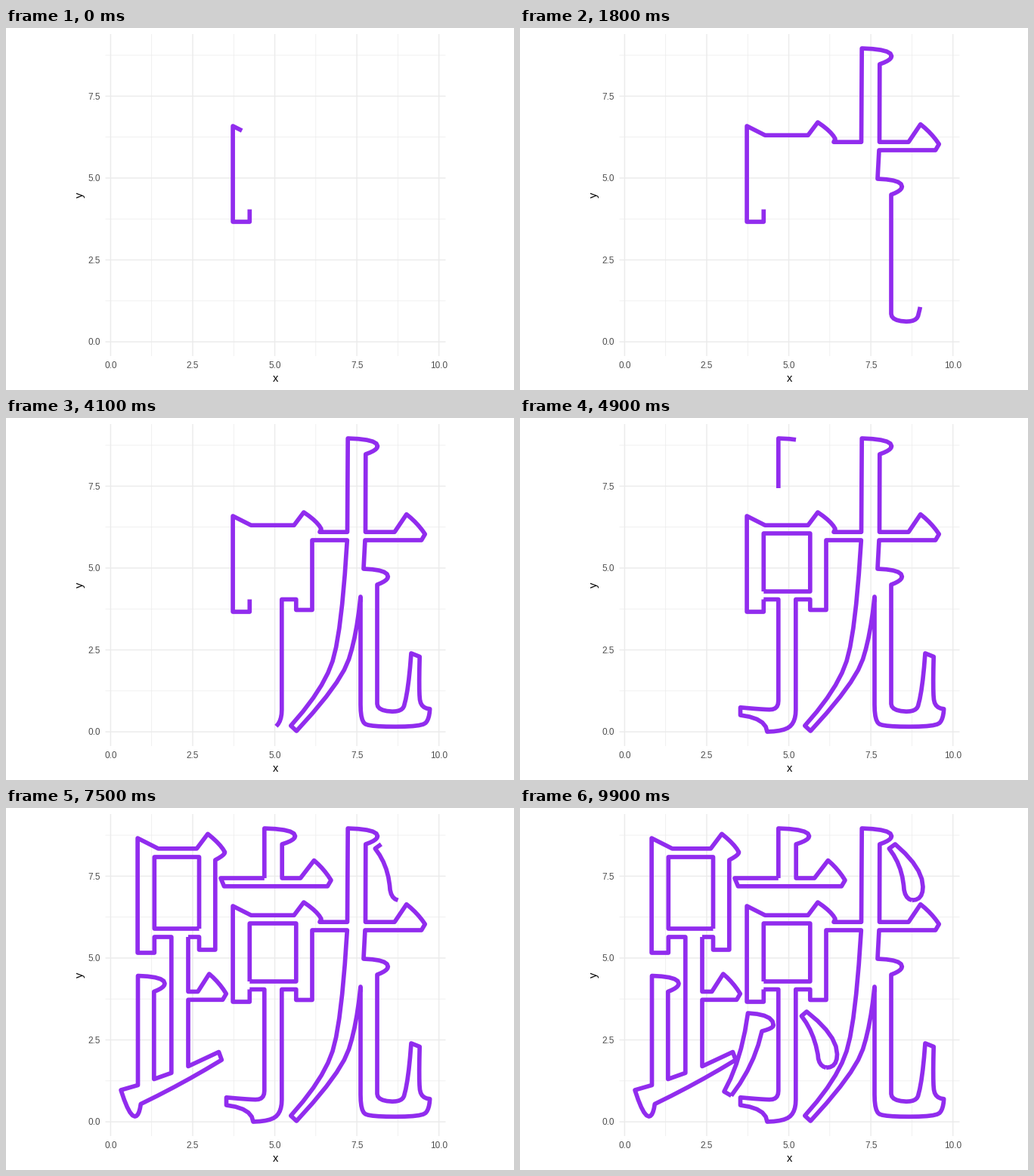
Write a matplotlib script that moves like this. It is 672 px wide and 480 px high and loops after 10 s.

```python
import numpy as np
import matplotlib.pyplot as plt
from matplotlib.animation import FuncAnimation

W, H, DPI = 672, 480, 96
FRAMES, STEP = 100, 100
SEGS = 5  # line pieces per quadratic curve

plt.rcParams["font.family"] = "Liberation Sans"
plt.rcParams["path.simplify"] = False


class Pen:
    """Collects outline vertices in stage pixels; NaN rows lift the pen."""

    def __init__(self):
        self.pts = []

    def start(self, x, y):
        if self.pts:
            self.pts.append((np.nan, np.nan))
        self.pts.append((x, y))
        self.home = x, y

    def go(self, x=None, y=None):
        px, py = self.pts[-1]
        self.pts.append((px if x is None else x, py if y is None else y))

    def by(self, dx, dy):
        x, y = self.pts[-1]
        self.pts.append((x + dx, y + dy))

    def steps(self, *values):
        """Right-angled moves, alternating x and y."""
        for i, v in enumerate(values):
            self.go(**{"xy"[i % 2]: v})

    def close(self):
        self.go(*self.home)

    def bend(self, *coords):
        """Smooth curve: control points, then the end."""
        *ctrl, end = np.reshape(np.array(coords, float), (-1, 2))
        for i, c in enumerate(ctrl):
            a = np.array(self.pts[-1])
            b = end if i == len(ctrl) - 1 else (c + ctrl[i + 1]) / 2
            for t in np.linspace(0, 1, SEGS + 1)[1:]:
                p = (1 - t) ** 2 * a + 2 * t * (1 - t) * c + t * t * b
                self.pts.append(tuple(p))

    def head(self, w, foot, drop=10.3, fall=21):
        """Rounded cap on top of a vertical stroke."""
        x, y = self.pts[-1]
        self.bend(x + w, y + drop / 10, x + w, y + drop)
        self.bend(x + w, y + (drop + fall) / 2, x + foot, y + fall)

    def peak(self, dx, w):
        """Triangle that ends a horizontal stroke."""
        self.by(dx, -23.5)
        x, y = self.pts[-1]
        self.bend(x + w * 0.6, y + 11.5, x + w, y + 26.3)
        self.by(-4.7, 8)

    def frame(self, foot, top, right, rise):
        """Left leg, ear and top edge of a box-shaped part."""
        self.by(0, foot)
        self.by(-22.2, 0)
        self.go(y=top)
        self.by(rise * 1.4, rise * 0.71)
        self.go(x=right)
        self.by(rise * 0.75, -rise)

    def dot(self, x, y, lean):
        self.start(x, y)
        self.bend(x - 10.5, y - 2.3, x - 11, y - 20 + lean)
        self.bend(x - 14 - lean, y - 48, x - 30.2 - lean, y - 68.5)
        self.by(8 - lean / 2, -5.8)
        self.bend(x + 14.5, y - 43, x + 14.5, y - 17.8)
        self.bend(x + 14.5, y, x, y)


def outline():
    p = Pen()

    # right part joined to the middle one
    p.start(322.3, 240.5)
    p.frame(16.5, 130, 381, 17.2)
    p.bend(412, 137, 417, 147)
    p.go(415, 151.2)
    p.go(451.5)
    p.go(452.2, 27)
    p.head(39.3, 23.6)
    p.go(475.5, 151.2)
    p.go(514)
    p.peak(15.8, 24.5)
    p.go(475)
    p.go(473, 200)
    p.head(32.3, 18)
    p.go(y=379)
    p.bend(491.2, 388.5, 511, 389.2)
    p.bend(524, 389.2, 526.5, 382)
    p.bend(532.5, 362, 536, 312)
    p.go(547.2, 316.5)
    p.bend(546, 362, 549, 385, 560.7, 385.8)
    p.bend(560, 399.5, 550, 409.3, 515, 409.3)
    p.bend(482, 409.3, 469, 402.5, 469, 380)
    p.go(y=237)
    p.bend(464, 288, 443, 352, 384.3, 415)
    p.go(376.8, 408)
    p.bend(420, 360, 444, 285, 451.3, 162)
    p.steps(405, 254.5, 383.8, 240.5, 364.8, 387)
    p.bend(364.8, 402, 350, 415.5, 327, 416)
    p.bend(325.5, 398, 291.5, 394)
    p.go(y=383.8)
    p.bend(318, 386.3, 341.8, 387, 341.8, 375)
    p.go(y=240.5)
    p.close()

    p.start(322.3, 230)
    p.steps(383.8, 153, 322.3, 230)

    # lid above the middle
    p.start(341.8, 93)
    p.go(y=27)
    p.head(40.7, 23.4)
    p.go(y=93)
    p.go(389.5)
    p.peak(18, 22.5)
    p.go(288.5)
    p.go(284, 93)
    p.close()

    # left part
    p.start(241, 171)
    p.go(y=243.5)
    p.go(253.8)
    p.peak(15, 22.5)
    p.steps(241, 342.5)
    p.go(281.5, 323.5)
    p.go(285.3, 334)
    p.bend(234, 365.5, 178.3, 392.5)
    p.bend(176, 409, 170.5, 409)
    p.bend(163, 409, 152, 374)
    p.go(174.5, 367.5)
    p.go(y=222.5)
    p.head(35.5, 21.3)
    p.go(y=359.5)
    p.go(218.8, 351.3)
    p.go(y=171)
    p.go(196.3)
    p.frame(21, 40, 252.3, 19.5)
    p.bend(284, 48, 289.5, 58.5)
    p.bend(290, 62, 276.8, 69)
    p.go(y=188)
    p.steps(255.5, 171, 241)

    p.start(255.5, 160)
    p.go(y=65)
    p.steps(196.3, 160, 255.5)

    p.dot(518.5, 122.3, 0)
    p.dot(405, 344.3, 2.4)

    p.start(279.5, 381.5)
    p.go(270, 376)
    p.bend(293, 335, 301.5, 272)
    p.head(33.8, 18.5, 16, 24)
    p.bend(310, 342, *p.home)
    return np.array(p.pts)


path = outline()
last = len(path) - 1


def point_at(u):
    i = min(int(u), last - 1)
    return path[i] + (u - i) * (path[i + 1] - path[i])


dense = np.arange(0, last, 0.05)
samples = np.array([point_at(u) for u in dense])


def locate(x, y):
    return dense[np.nanargmin(np.hypot(*(samples - (x, y)).T))]


# Where the tip is at chosen frames; it advances evenly in between.
TIP = [(0, 312, 136), (11, 500, 206), (18, 529, 370), (22, 557, 385),
       (34, 401, 378), (44, 311, 398), (49, 365, 28), (55, 271, 222),
       (61, 157, 389), (66, 213, 353), (75, 496, 48), (77, 530, 91),
       (88, 417, 333)]
key_frames = [k[0] for k in TIP] + [FRAMES - 1]
key_pos = [locate(x, y) for _, x, y in TIP] + [last]

fig = plt.figure(figsize=(W / DPI, H / DPI), dpi=DPI, facecolor="white")
ax = fig.add_axes([0, 0, 1, 1])
ax.set_xlim(0, W)
ax.set_ylim(H, 0)
ax.axis("off")

X0, Y0, UNIT = 138.4, 416.1, 43.43
LEFT, RIGHT, TOP, BOTTOM = 131.5, 581.5, 8, 435


def points(width):
    return width * 72 / DPI


def rule(xs, ys, major):
    ax.plot(xs, ys, color="#EBEBEB", lw=points(1.42 if major else 0.71),
            solid_capstyle="butt", snap=False, zorder=2 if major else 1)


def label(x, y, text, size=8.8, color="#4D4D4D", ha="center", **kw):
    ax.text(x, y, text, size=size, color=color, ha=ha, va="baseline", **kw)


for k in range(9):
    v, major = k * 1.25, k % 2 == 0
    x, y = X0 + v * UNIT, Y0 - v * UNIT
    rule([x, x], [TOP, BOTTOM], major)
    if major:
        label(x, 451.3, f"{v:.1f}")
    if k < 8:
        rule([LEFT, RIGHT], [y, y], major)
        if major:
            label(124.7, y + 4.2, f"{v:.1f}", ha="right")

label(356.5, 468.7, "x", 11, "black")
label(101.5, 221.5, "y", 11, "black", rotation=90, rotation_mode="anchor")

stroke, = ax.plot([], [], color="#912CEE", lw=points(5.69), zorder=3,
                  snap=False, solid_capstyle="butt", solid_joinstyle="round")


def draw(frame):
    u = np.interp(frame, key_frames, key_pos)
    shown = np.vstack([path[:int(u) + 1], point_at(u)])
    stroke.set_data(shown[:, 0], shown[:, 1])
    return stroke,


anim = FuncAnimation(fig, draw, frames=FRAMES, interval=STEP,
                     init_func=lambda: draw(0), repeat=True, repeat_delay=0)
plt.show()
```
